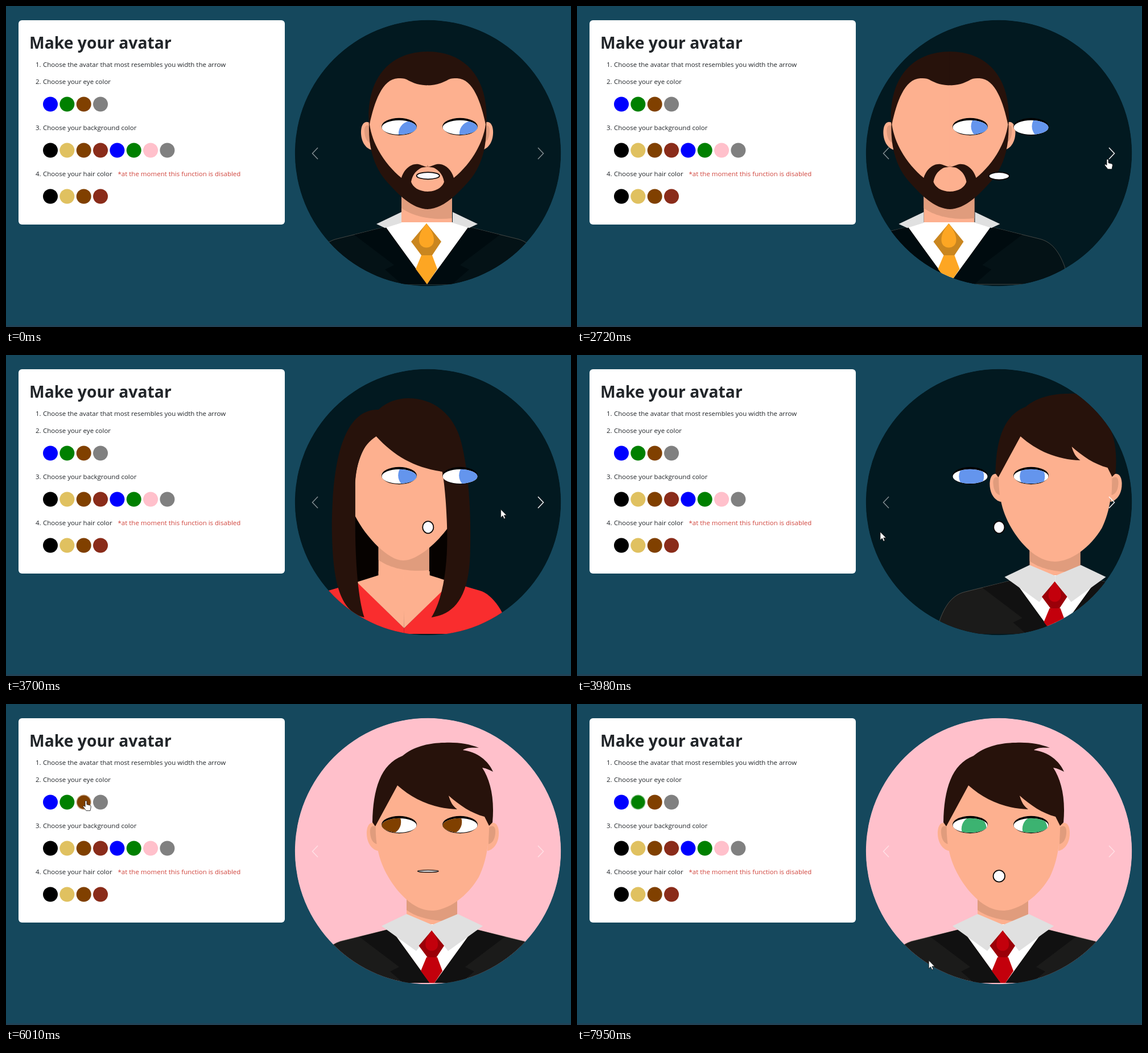
An HTML page that plays this animation: 993 by 564 pixels, repeating every 8000 ms.

```html
<!DOCTYPE html>
<html lang="en">
<head>
<meta charset="utf-8">
<title>Make your avatar</title>
<style>
  html, body { margin: 0; width: 100%; height: 100%; overflow: hidden; background: #15485d; }
  #stage { display: block; width: 993px; height: 564px; }
  text { font: 11.5px "Open Sans", "Noto Sans", sans-serif; fill: #212529; }
  .title { font-size: 28.3px; font-weight: 700; }
  .note { fill: #d0443c; }
  .hair { fill: #27120b; }
  .skin { fill: #fdb08f; }
  .shade { fill: #e09c7d; }
  .collar { fill: #e0e0e0; }
  .white { fill: #fff; }
  .dress { fill: #f92d2e; }
  .gap { fill: #060200; }
  .jacket { fill: var(--jacket); stroke: #85786f; stroke-width: .5; }
  .lapel { fill: var(--lapel); }
  .knot { fill: var(--knot); }
  .silk { fill: var(--silk); }
  #man { --jacket: #041216; --lapel: #000b0f; --knot: #ca861f; --silk: #fda623; }
  #boy { --jacket: #1b1b1a; --lapel: #111; --knot: #9b0008; --silk: #c3000c; }
  .chevron { fill: none; stroke: #fff; stroke-width: 1.5; }
</style>
</head>
<body>
<svg id="stage" viewBox="0 0 993 564">
  <defs>
    <clipPath id="disc"><circle cx="741.5" cy="258.5" r="233.7"/></clipPath>
    <clipPath id="lids">
      <ellipse cx="691" cy="213.4" rx="30.5" ry="12.6"/>
      <ellipse cx="798" cy="213.4" rx="30.5" ry="12.6"/>
    </clipPath>
  </defs>
  <rect y="561" width="993" height="3" fill="#214256"/>
  <rect x="22" y="25" width="468" height="359" rx="6" fill="#fff"/>
  <text class="title" x="41" y="75">Make your avatar</text>
  <g id="list"></g>

  <g clip-path="url(#disc)">
    <circle id="backdrop" cx="741.5" cy="258.5" r="234"/>
    <svg width="993" height="490"><g id="man"/><g id="woman"/><g id="boy"/></svg>
  </g>

  <ellipse cx="691" cy="212" rx="31" ry="15.2"/>
  <ellipse cx="798" cy="212" rx="31" ry="15.2"/>
  <g clip-path="url(#lids)">
    <path class="white" d="M655 195H835V230H655Z"/>
    <g id="irises"><circle r="22"/><circle cx="107" r="22"/></g>
  </g>
  <ellipse id="mouth" cx="741.8" fill="#fcfcff" stroke="#0a0606"/>
  <path class="chevron" d="M548 249l-9.500 10l9.500 10" opacity=".5"/>
  <path class="chevron" id="next" d="M935 249l9.500 10l-9.500 10"/>

  <g id="cursor" fill="#fff" stroke="#111" stroke-width=".8" stroke-linejoin="round">
    <path id="arrow" d="M0 0V14.500L3.400 11.300L5.700 16.500L8 15.500L5.800 10.400H10.300Z"/>
    <path id="hand" d="M0 1.500C0-.5 3-.5 3 1.500V6.500L9 8Q10.500 8.500 10.300 11L9 17.500H2L-3.500 10.500C-3.500 8.500-1.500 8.500 0 10.500Z"/>
  </g>
</svg>
<script>
const LOOP = 8000, SLIDE = 467;
const BLUE = '#0000ff', GREEN = '#008000', BROWN = '#804000', GRAY = '#808080', PINK = '#ffc0cb';
const hairColors = ['#000', '#e0c160', BROWN, '#8a2c1a'];
const $ = id => document.getElementById(id);

function set(id, attrs) {
  for (const name in attrs) $(id).setAttribute(name, attrs[name]);
}

// Instruction panel
const swatchX = i => 78 + i * 29.35;
const rowY = row => 172.5 + row * 81;
const swatchRow = (row, colors) => colors.map((fill, i) =>
  `<circle cx="${swatchX(i)}" cy="${rowY(row)}" r="13" fill="${fill}"/>`).join('');
const item = (n, y, label) => `<text x="52" y="${y}">${n}.</text><text x="65" y="${y}">${label}</text>`;

$('list').innerHTML =
  item(1, 107, 'Choose the avatar that most resembles you width the arrow') +
  item(2, 137, 'Choose your eye color') +
  swatchRow(0, [BLUE, GREEN, BROWN, GRAY]) +
  item(3, 218, 'Choose your background color') +
  swatchRow(1, [...hairColors, BLUE, GREEN, PINK, GRAY]) +
  item(4, 299, 'Choose your hair color') +
  '<text class="note" x="196.5" y="299">*at the moment this function is disabled</text>' +
  swatchRow(2, hairColors) +
  `<circle id="ring" cy="${rowY(0)}" r="12.5" fill="none" stroke="#fff" stroke-opacity=".5" stroke-width="1.5"/>`;

// Avatars: x is measured from each avatar's axis, paired parts are mirrored
const part = (cls, d) => `<path class="${cls}" d="${d}"/>`;
const both = (cls, d) => part(cls, d) + `<g transform="scale(-1 1)">${part(cls, d)}</g>`;
const move = (x, y, content, scale = 1) => `<g transform="translate(${x} ${y}) scale(${scale})">${content}</g>`;

const ears =
  both('skin', 'M-98 208C-105 200-115 203-116 219C-117 236-109 251-96 253Z') +
  both('shade', 'M-99 212C-107 206-111 212-110 222C-109 234-104 240-98 241Z');
const neck =
  part('skin', 'M-45 325H44V382H-45Z') +
  part('shade', 'M-45 325H44V373C10 377-25 370-45 355Z');
const suit =
  both('white', 'M-74 388L-45 380H1V489Z') +
  both('jacket', 'M-203 489V459C-191 425-175 413-158 409L-73 388L0 489Z') +
  both('lapel', 'M-73 388L-128 402L-58 455L-74 463L-44 489H0Z');
const tail = part('silk', 'M-10 438H9L18 462L0 489L-20 462Z');
const knot =
  part('knot', 'M-1 382L25 414L9 438H-10L-28 414Z') +
  part('silk', 'M-1 382C6 392 12 400 12 411C12 429-14 429-14 411C-14 400-8 391-1 382Z');

const beardedHead =
  both('hair', 'M-103 210C-109 130-69 80 1 80V357C-27 357-53 330-74 306C-96 280-104 245-103 210Z') +
  both('skin', 'M-102 208C-94 170-80 128-52 127C-46 127-42 127-37 129C-25 136-13 139.500 1 139.500V283C-4 283-8 280-16 278C-30 276-42 288-46 302C-73 280-97 245-102 208Z') +
  both('hair', 'M-1 279L1 300H-1Z') +
  both('skin', 'M-29 309C-27 298-22 291-14 286C-10 283-5 283 1 283V326C-16 326-26 318-29 309Z');
const longHair = part('hair', 'M-45 96C-30 82-11 76 7 76C57 76 92 110 102 160C115 215 118 290 116 350C114 430 85 456 48 461C73 420 78 350 75 290C73 245 70 220 67 205C19 198-17 178-49 143C-73 158-83 185-86 225V290C-86 370-80 430-70 461C-119 450-126 380-127 300C-126 190-108 95-45 96Z');
const shortHair = part('hair', 'M-100 215L-105 208C-104 150-91 106-52 91C-31 73-1 68 22 68C44 67 65 70 82 77C69 76 58 77 54 81C79 84 99 100 107 119C101 116 95 113 88 112C102 133 110 165 106 208L100 214L92 198C69 192 48 178 29 161C32 172 36 179 44 185C3 184-33 168-61 143Z');

$('man').innerHTML = move(740, 0,
  ears + neck + move(1, 0, beardedHead) + suit +
  both('collar', 'M-45 362V381L-74 390L-89 383Z') + tail + knot);

$('woman').innerHTML = move(749, 0,
  part('gap', 'M-86 230H77V425H-86Z') +
  both('dress', 'M-185 490C-179 455-157 421-133 414L-82 399L0 480V490Z') +
  both('skin', 'M-45 387L-83 399L0 480L1 380H-45Z') +
  move(0, 5, neck) +
  part('skin', 'M-50 140L69 200C74 235 76 270 76 305C55 333 22 361-2 361C-27 361-66 322-86 283V220C-83 180-63 145-50 140Z') +
  longHair);

$('boy').innerHTML = move(749, 0,
  move(1, 5, ears) + move(0, 7, neck) +
  part('skin', 'M-61 135H41L99 200C101 242 96 275 82 304C62 338 28 363-1 363C-33 363-62 330-77 304C-93 277-101 246-99 207Z') +
  shortHair + move(0, 7, suit) +
  both('collar', 'M-45 369L0 388V398L-28 434L-89 390Z') +
  move(0, 7, tail) + move(0, 77, knot, .84));

// Cursor stops: time, x, y
const stops = [
  [0, 884, 568], [940, 234, 410], [1560, 800, 142], [1880, 941, 213],
  [2400, 931, 271], [3650, 931, 264], [3980, 534, 311], [4250, 252, 252], [4700, 252, 252],
  [5400, 139, 170], [6100, 139, 170], [6700, 107, 173], [7100, 107, 173],
  [7520, 497, 297], [LOOP, 632, 468]
];

const ramp = (t, from, to) => Math.min(1, Math.max(0, (t - from) / (to - from)));

function cursorAt(t) {
  const i = stops.findIndex(s => s[0] > t);
  const [t0, x0, y0] = stops[i - 1], [t1, x1, y1] = stops[i];
  const k = ramp(t, t0, t1);
  return [x0 + (x1 - x0) * k, y0 + (y1 - y0) * k];
}

// cubic-bezier(.42, 0, .58, 1)
function easeInOut(x) {
  let lo = 0, hi = 1, s;
  for (let i = 0; i < 20; i++) {
    s = (lo + hi) / 2;
    const r = 1 - s;
    if (1.26 * s * r * r + 1.74 * s * s * r + s ** 3 < x) lo = s; else hi = s;
  }
  return s * s * (3 - 2 * s);
}

const slide = (t, from) => easeInOut(ramp(t, from, from + 600));

function drawMouth(t) {
  const close = ramp(t, 0, 500), open = ramp(t, 2480, 2720);
  const round = ramp(t, 2720, 2970), widen = ramp(t, 4000, 5000);
  const w = 42 - 4 * close - 17 * round + 21 * widen;
  const h = 14 - 9 * close + 10 * open + 8 * round - 9 * widen;
  const line = h < 8 ? 1.4 : 1.8;
  set('mouth', { cy: 291.2 + h / 2, rx: (w - line) / 2, ry: (h - line) / 2, 'stroke-width': line });
}

function draw(t) {
  const [x, y] = cursorAt(t);
  const overSwatch = [0, 1, 2].some(row => Math.abs(y - rowY(row)) < 13) && x > 65 && x < 297;
  const pointing = x > 905 || overSwatch;
  set('cursor', { transform: `translate(${x} ${y})` });
  $('arrow').style.display = pointing ? 'none' : '';
  $('hand').style.display = pointing ? '' : 'none';

  const turn = slide(t, 2543) + slide(t, 3565);
  ['man', 'woman', 'boy'].forEach((id, i) => set(id, { transform: `translate(${(i - turn) * SLIDE})` }));
  set('backdrop', { fill: t < 4600 ? '#021920' : PINK });
  set('next', { opacity: .5 + .45 * (ramp(t, 1740, 1890) - ramp(t, 4650, 4800)) });

  set('irises', {
    transform: `translate(${664.8 + 53 * x / 993} ${200 + 24 * Math.min(y / 564, 1)})`,
    fill: t < 5750 ? '#6495ed' : t < 6900 ? BROWN : '#3cb371'
  });
  set('ring', { cx: swatchX(t < 6900 ? 2 : 1), opacity: t < 5750 ? 0 : 1 });
  drawMouth(t % 5000);
}

const start = performance.now();
function tick() {
  draw((performance.now() - start) % LOOP);
  requestAnimationFrame(tick);
}
tick();
</script>
</body>
</html>
```
